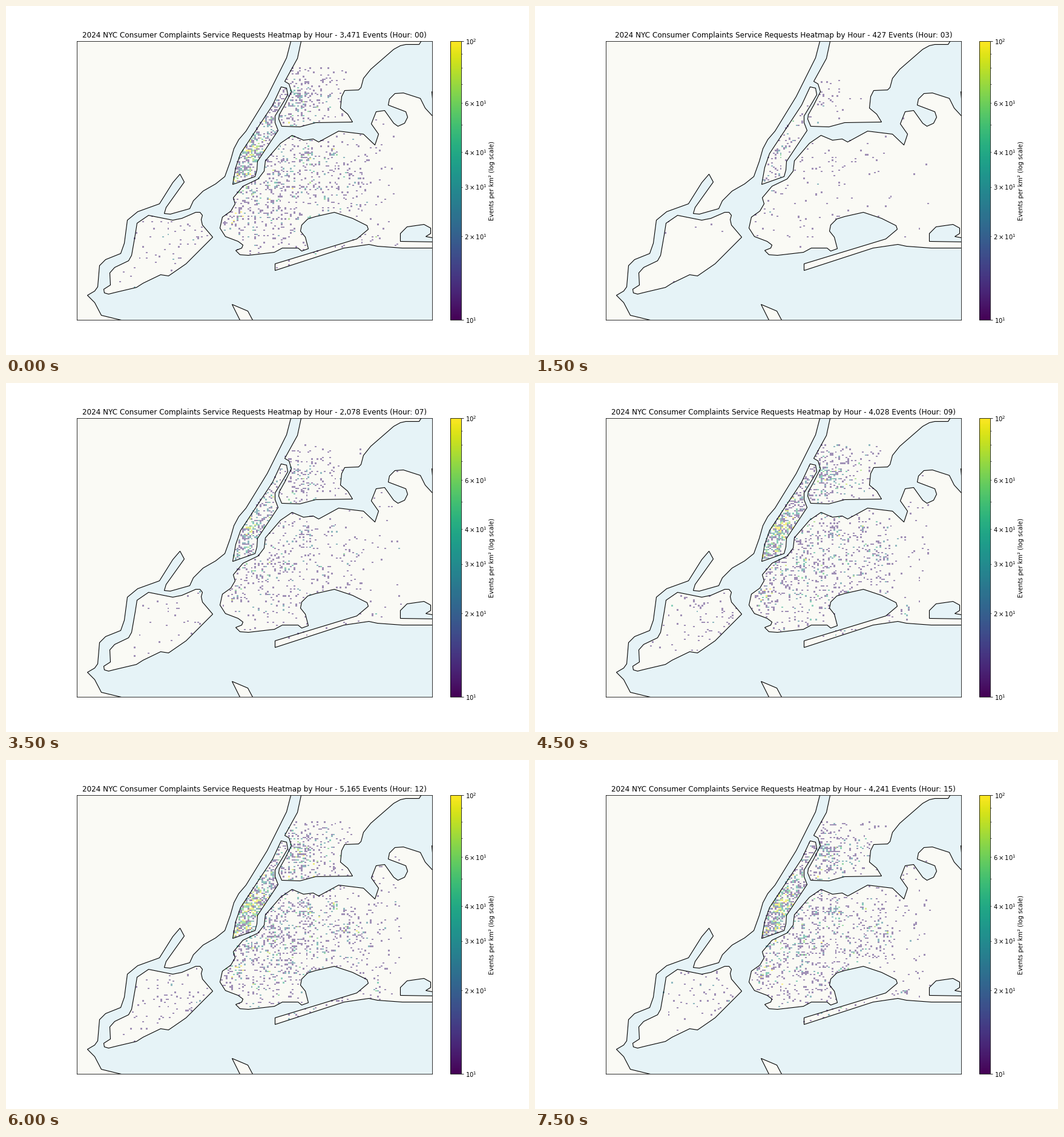
A matplotlib script that plays this animation: 864x576 px, repeating every 8000 ms.

```python
import numpy as np
import matplotlib.pyplot as plt
from matplotlib.animation import FuncAnimation
from matplotlib.cm import ScalarMappable
from matplotlib.colors import LogNorm
from matplotlib.patches import Polygon
from matplotlib.path import Path

W, H = 864, 576
MAP_BOX = [116.8 / W, 0.1, 587.2 / W, 0.8]
LEFT, RIGHT, TOP, BOTTOM = 116.8, 704, 0.1 * H, 0.9 * H
BINS, HOURS = 200, 16
LAND, WATER = "#fafaf5", "#e6f3f7"
CELL_DENSITY = 12.9  # one event in one cell, per square km
MAPPED = 0.55        # share of events that fall on the map

# Total events at a few key hours, linear in between
KEY_EVENTS = {0: 3471, 1: 742, 3: 427, 6: 938, 7: 2078,
              9: 4028, 11: 5331, 13: 4999, 15: 4241}

# Key points of the outlines in stage pixels, y down
MAINLAND = [
    (470, 50), (470, 58), (463, 85), (431, 149), (396, 206), (384, 220),
    (376, 235), (370, 256), (361, 281), (346, 293), (325, 305), (309, 321),
    (303, 334), (271, 343), (261, 342), (264, 332), (294, 290), (287, 277),
    (275, 291), (253, 326), (228, 335), (217, 339), (200, 353), (195, 391),
    (189, 408), (164, 418), (154, 428), (151, 463), (146, 470), (134, 477),
    (146, 489), (157, 510), (190, 518), (218, 525), (100, 525), (100, 50)]
STATEN = [
    (235, 345), (275, 353), (290, 350), (313, 340), (320, 340), (324, 345),
    (322, 352), (324, 361), (341, 381), (297, 425), (268, 445), (255, 443),
    (226, 457), (215, 464), (181, 472), (169, 475), (162, 473), (161, 467),
    (172, 460), (171, 440), (179, 431), (202, 420), (207, 411), (213, 377),
    (216, 358)]
MANHATTAN = [
    (454, 133), (463, 135), (465, 146), (458, 158), (444, 181), (444, 192),
    (449, 205), (415, 256), (414, 270), (411, 281), (374, 294), (379, 266),
    (387, 243), (440, 163)]
BRONX = [
    (487, 50), (487, 58), (481, 86), (460, 124), (467, 128), (471, 141),
    (460, 163), (451, 179), (450, 186), (455, 198), (485, 199), (511, 192),
    (572, 191), (564, 178), (552, 168), (554, 149), (559, 139), (582, 138),
    (586, 134), (590, 119), (602, 104), (640, 71), (651, 65), (660, 63),
    (682, 63), (690, 50)]
ISLAND = [
    (428, 255), (426, 272), (416, 285), (391, 297), (375, 316), (378, 326),
    (371, 338), (357, 348), (353, 366), (362, 380), (383, 388), (391, 394),
    (389, 399), (379, 403), (386, 410), (400, 411), (443, 406), (456, 399),
    (482, 399), (488, 404), (499, 400), (494, 381), (486, 371), (488, 361),
    (498, 351), (511, 347), (542, 340), (572, 350), (596, 362), (598, 368),
    (579, 384), (444, 425), (444, 436), (558, 399), (599, 393), (613, 396),
    (654, 399), (715, 399), (715, 190), (704, 181), (692, 168), (684, 152),
    (656, 143), (642, 144), (633, 153), (631, 163), (660, 174), (663, 183),
    (658, 193), (647, 198), (640, 193), (625, 172), (611, 174), (603, 194),
    (615, 211), (609, 229), (590, 211), (549, 206), (516, 224), (507, 219),
    (491, 221), (472, 213), (453, 226)]
HOOK = [(373, 492), (399, 503), (407, 518), (411, 526), (390, 526)]
POINT = [(715, 137), (703, 141), (704, 152), (715, 155)]
POND = [(651, 388), (651, 375), (662, 364), (690, 360), (701, 366), (701, 375),
        (693, 380), (715, 384), (715, 389)]

# Outline, centre, spread and share of events
BOROUGHS = [(MANHATTAN, 410, 230, 60, 26), (BRONX, 482, 158, 28, 17),
            (ISLAND, 445, 300, 65, 42), (STATEN, 285, 375, 60, 3)]
# Centre, spread and share of events
HUBS = [(402, 242, 7, 12), (392, 274, 8, 5), (380, 287, 3, 1.5), (482, 147, 7, 2),
        (497, 249, 8, 3), (543, 240, 3, 1.5), (570, 289, 12, 2.5),
        (402, 303, 9, 3), (380, 348, 7, 2), (612, 382, 3, 0.5)]


def cell_weights(xe, ye):
    x, y = np.meshgrid((xe[1:] + xe[:-1]) / 2, (ye[1:] + ye[:-1]) / 2)
    pts = np.column_stack([x.ravel(), y.ravel()])
    city = (y > 101) & (x < 655)
    weights, land = np.zeros_like(x), np.zeros_like(city)

    def add(falloff, area, share):
        part = falloff * area
        return share * part / part.sum()

    for shape, cx, cy, spread, share in BOROUGHS:
        area = Path(shape).contains_points(pts).reshape(x.shape) & city
        land |= area
        weights += add(np.exp(-np.hypot(x - cx, y - cy) / spread), area, share)
    for cx, cy, spread, share in HUBS:
        d = np.hypot(x - cx, y - cy) / spread
        weights += add(np.exp(-d * d / 2), land, share)
    weights *= np.random.default_rng(24).lognormal(0, 1.25, x.shape)
    return weights / weights.sum()


def hourly_density(hour):
    rng = np.random.default_rng(100 + hour)
    n = rng.multinomial(int(events[hour] * MAPPED), weights.ravel())
    return np.ma.masked_equal(n.reshape(weights.shape), 0) * CELL_DENSITY


fig = plt.figure(figsize=(W / 72, H / 72), dpi=72)
ax = fig.add_axes(MAP_BOX)
ax.set(xticks=[], yticks=[], facecolor=WATER)
for shape in (MAINLAND, STATEN, MANHATTAN, BRONX, ISLAND, HOOK, POINT, POND):
    pts = np.array(shape) + 0.5
    ax.add_patch(Polygon(pts, fc=WATER if shape is POND else LAND, ec="none", zorder=0.5))
    ax.add_patch(Polygon(pts, fill=False, ec="black", lw=1.1, zorder=3))

xe = np.linspace(LEFT, RIGHT, BINS + 1)
ye = np.linspace(TOP, BOTTOM, BINS + 1)
events = np.interp(range(HOURS), list(KEY_EVENTS), list(KEY_EVENTS.values())).astype(int)
weights = cell_weights(xe, ye)
grids = [hourly_density(h) for h in range(HOURS)]
norm = LogNorm(10, 100)
mesh = ax.pcolormesh(xe, ye, grids[0], cmap="viridis", norm=norm, alpha=0.5, zorder=2)
ax.set(xlim=(LEFT, RIGHT), ylim=(BOTTOM, TOP))
title = ax.set_title("", fontsize=12)

fig.colorbar(ScalarMappable(norm, "viridis"), cax=fig.add_axes([0.85, 0.1, 0.02, 0.8]),
             label="Events per km² (log scale)")


def update(hour):
    mesh.set_array(grids[hour])
    title.set_text("2024 NYC Consumer Complaints Service Requests Heatmap by Hour"
                   f" - {events[hour]:,} Events (Hour: {hour:02d})")
    return mesh, title


anim = FuncAnimation(fig, update, frames=HOURS, interval=500,
                     repeat=True, repeat_delay=0)
plt.show()
```
